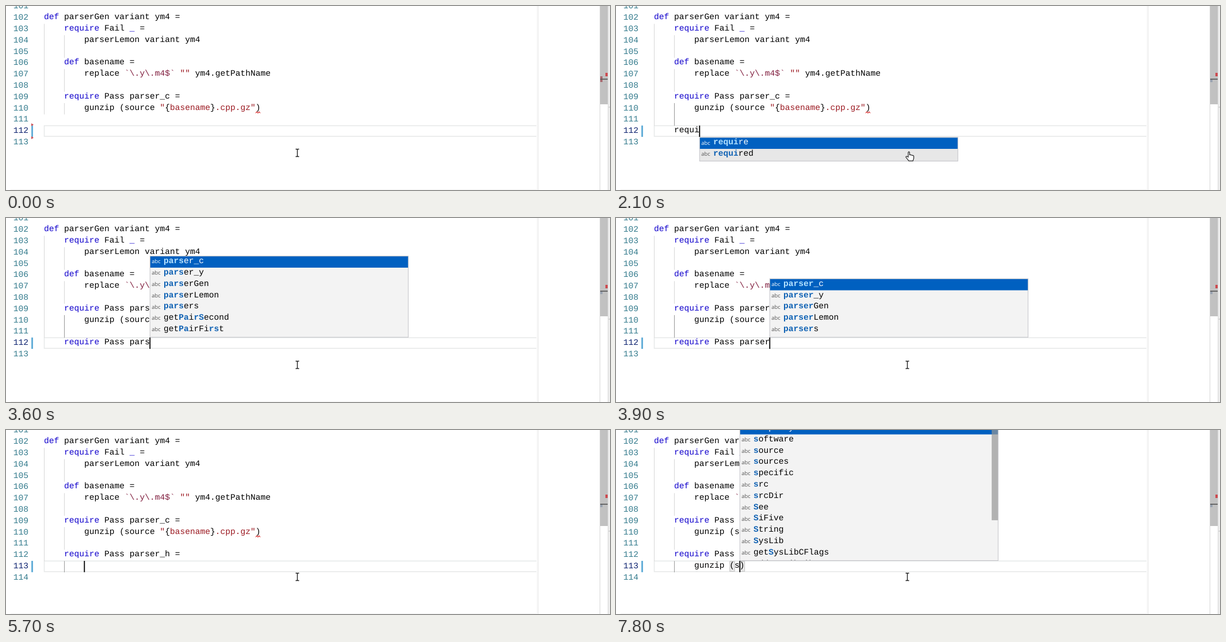
An HTML page that plays this animation: 1050x322 px, repeating every 8 s.

```html
<!DOCTYPE html>
<html lang="en">
<head>
<meta charset="utf-8">
<title>Code completion</title>
<style>
  html, body { margin: 0; width: 100%; height: 100%; overflow: hidden; background: #fff; }
  svg { display: block; width: 1050px; height: 322px; }
  text { font: 14.6px "Liberation Mono", monospace; fill: #000; white-space: pre; text-rendering: geometricPrecision; }
  .k { fill: #1000cc; }
  .s { fill: #9c1a22; }
  .r { fill: #811f3f; }
  .n { fill: #327a8c; }
  .on { fill: #0b216f; }
  .m { fill: #0f62b4; font-weight: bold; }
  .w { fill: #fff; }
  .wm { fill: #b5e2ff; font-weight: bold; }
  .abc { font: 9.4px "Open Sans", sans-serif; fill: #555; }
  .abc.w { fill: #fff; }
</style>
</head>
<body>
<svg id="stage" viewBox="0 0 1050 322"></svg>
<script>
const LOOP = 8000, STEP = 300;
const CW = 8.757, LH = 19.8, LEFT = 66;
const stage = document.getElementById('stage');

const lines = [
  '<k>def</> parserGen variant ym4 =',
  '    <k>require</> Fail <k>_</> =',
  '        parserLemon variant ym4',
  '',
  '    <k>def</> basename =',
  '        replace <r>`\\.y\\.m4$`</> <s>""</> ym4.getPathName',
  '',
  '    <k>require</> Pass parser_c =',
  '        gunzip (source <s>"</>{<s>basename</>}<s>.cpp.gz"</>)',
  ''
];

const words = list => list.split(' ');
const rWords = words('require required replace result return rules run runtime read resources');
const pWords = words('Pass Path Pair Package parser_c parser_y parserGen parserLemon parsers path prefix publish');
const parsWords = words('parser_c parser_y parserGen parserLemon parsers getPairSecond get*Pa*irFi*rs*t');
const gWords = words('getPathName gunzip getPairFirst getPairSecond getPathParent getSysLibCFlags global glob generated group grep');
const sWords = words('simplify software source sources specific src srcDir See SiFive String SysLib getSysLibCFlags addSysLibLibs');
const reqWords = rWords.slice(0, 2);

const PASS = '    require Pass ', GUN = '        gunzip';
// row, text before the caret, caret shown, completion list, pointer, text after the caret
const steps = [
  [112, '', 0],
  [112, '', 1],
  [112, '    ', 1],
  [112, '    ', 0],
  [112, '    r', 1, rWords],
  [112, '    re', 1, rWords.slice(0, 5)],
  [112, '    req', 1, reqWords, 'arrow'],
  [112, '    requi', 1, reqWords, 'hand'],
  [112, '    require', 1, reqWords, 'hand'],
  [112, '    require P', 1, pWords],
  [112, '    require Pass', 1, ['Pass', 'parsers'], 'arrow'],
  [112, PASS + 'p', 1, pWords],
  [112, PASS + 'pars', 1, parsWords],
  [112, PASS + 'parser', 1, parsWords.slice(0, 5)],
  [112, PASS + 'parser_', 1, parsWords.slice(0, 2), 'arrow'],
  [112, PASS + 'parser_h', 1],
  [112, PASS + 'parser_h', 0],
  [112, PASS + 'parser_h =', 1],
  [112, PASS + 'parser_h =', 0],
  [113, '        ', 1],
  [113, '        ', 0],
  [113, '        g', 1, gWords],
  [113, '        gun', 1, ['gunzip'], 'arrow'],
  [113, GUN, 0, ['gunzip'], 'arrow'],
  [113, GUN + ' ', 1],
  [113, GUN + ' (', 1, null, '', ')'],
  [113, GUN + ' (s', 1, sWords, '', ')']
];

const lineTop = n => 209.2 + LH * (n - 112);
const baseline = n => 23.2 + LH * (n - 102);
const rect = (x, y, w, h, fill, more = '') =>
  `<rect x="${x}" y="${y}" width="${w}" height="${h}" fill="${fill}" ${more}/>`;
const text = (x, y, str, cls = '') => `<text x="${x}" y="${y}" class="${cls}">${str}</text>`;

// Places coloured runs on the character grid.
function runs(x, y, parts) {
  let col = 0, out = '';
  for (const [str, cls] of parts) {
    if (str.trim()) {
      const lead = str.length - str.trimStart().length;
      out += text(x + (col + lead) * CW, y, str.trim(), cls);
    }
    col += str.length;
  }
  return out;
}

function code(n, src) {
  const parts = src.split(/(<\w>.*?<\/>)/).map(p =>
    /^<\w>/.test(p) ? [p.slice(3, -3), p[1]] : [p, '']);
  return runs(LEFT, baseline(n), parts);
}

const keywords = str => str.replace(/\brequire\b/, '<k>require</>');

// Splits a suggestion into matched and plain runs.
function matchParts(word, query, plain, hit) {
  if (word.includes('*')) return word.split('*').map((p, i) => [p, i % 2 ? hit : plain]);
  let q = 0;
  return [...word].map(ch => {
    const found = q < query.length && ch.toLowerCase() === query[q].toLowerCase();
    if (found) q++;
    return [ch, found ? hit : plain];
  });
}

function popup(row, before, list, pointer) {
  const x = Math.round(LEFT + before.length * CW) + 0.3;
  const query = before.match(/\w*$/)[0];
  const shown = Math.min(list.length, 12);
  const above = shown > 4;
  const h = shown * LH + (above ? 4.5 : 3);
  const top = above ? lineTop(row) - h : lineTop(row) + LH + 0.3;
  let out = `<clipPath id="box">${rect(x, top, 449, h, '#000')}</clipPath><g clip-path="url(#box)">`;
  out += rect(x, top, 449, h, '#f3f3f3') + rect(x, top + 1, 449, LH, '#0060c0');
  if (pointer === 'hand') out += rect(x, top + 1 + LH, 449, LH + 2, '#e7e7e7');
  list.forEach((word, i) => {
    const y = top + 13 + i * LH;
    out += text(x + 3, y + 0.3, 'abc', i ? 'abc' : 'abc w');
    out += runs(x + 23.6, y, matchParts(word, query, i ? '' : 'w', i ? 'm' : 'wm'));
  });
  if (list.length > 12) out += rect(x + 437.8, top, 11.2, 171, '#979797', 'opacity=".7"');
  return out + '</g>' + rect(x, top + 0.5, 449, h - 1, 'none', 'stroke="#c4c4c8"');
}

const pointers = {
  beam: '<path d="M503.5 250.5h2.2l.8 1 .8-1h2.2M506.5 251.5v11M503.5 263.5h2.2l.8-1 .8 1h2.2" fill="none" stroke="#222" stroke-width="1.4"/>',
  arrow: '<path d="M507 257v15l3.4-3.1 2.5 5 2.3-1.1-2.4-4.8h4.4z" fill="#222" stroke="#fff" stroke-width=".8"/>',
  hand: '<path d="M508 264.5v-8.3q1.2-2 2.4 0v4.3q1.5-.8 2.4.5 1.5-.7 2.3.6 2-.5 2.5 1v4l-1.5 4.6h-7l-5-6.4q-.4-2 1.5-1.7z" fill="#fff" stroke="#222" stroke-width="1.2"/>'
};

const guide = (x, from, to, color = '#d6d6d6') =>
  rect(x, lineTop(from) + 0.3, 1, (to - from + 1) * LH, color);

function guides(row, before) {
  const open = before.length > 0;
  let out = guide(66, 103, open ? row - 1 : 110);
  out += guide(101, 104, 105) + guide(101, 107, 108);
  if (row === 113) out += guide(101, 110, 111) + guide(101, 113, 113, '#9a9a9a');
  else out += open ? guide(101, 110, 111, '#979797') : guide(101, 110, 110);
  return out;
}

function rightSide(row, removed) {
  const late = row === 113;
  const red = late ? 113 : 117, mark = late ? 129 : 127.2;
  let out = rect(922, 0, 3, 322, '#fafafa') + rect(924.5, 0, 1, 322, '#e6e6e6');
  out += rect(1032, 0, 1, 322, '#d8d8d8') + rect(1033, 0, 13, late ? 168 : 172, '#c1c1c1');
  out += rect(1046.5, 0, 1, 322, '#bdbdbd') + rect(1047.5, 0, 2.5, 322, '#f0f0f0');
  out += rect(1047.5, 176.5, 2.5, 1, '#bbb');
  out += rect(1042, red, 4, 6, '#cc4a50');
  out += removed ? rect(1033, 123, 4, 10, '#a86a70') : rect(1033, mark + 1, 4, 5, '#98a2b0');
  return out + rect(1033, mark, 13, 1.7, '#5a5a5a');
}

function squiggle() {
  let d = 'M434 187.5';
  for (let i = 0; i < 4; i++) d += `l2 ${i % 2 ? 2.4 : -2.4}`;
  return `<path d="${d}" fill="none" stroke="#d62020" stroke-width="1.1"/>`;
}

function draw([row, before, caret, list, pointer, after = '']) {
  const top = lineTop(row), removed = !before;
  const caretX = LEFT + before.length * CW;
  let out = rect(8, 321, 917, 1, '#f3f3f3');
  out += rect(66.5, top + 0.3, 858, LH - 1.2, 'none', 'stroke="#e4e7e7" stroke-width="1.4"');
  out += guides(row, before);
  for (let n = 101; n <= row + 1; n++)
    out += text(12.8, baseline(n) + 0.9, n, n === row ? 'on' : 'n');
  lines.forEach((src, i) => { out += code(102 + i, src); });
  out += squiggle();
  out += rect(44, top, 3, LH, '#66afd8');
  if (removed) {
    for (const y of [top - 4, top + LH - 1])
      out += `<path d="M44 ${y}v5l4-2.5z" fill="#ca4b51"/>`;
  }
  if (row === 113) out += code(112, keywords(PASS + 'parser_h ='));
  if (after) {
    for (const x of [LEFT + before.indexOf('(') * CW, caretX])
      out += rect(x + 0.5, top + 1, CW - 0.5, LH - 2.5, '#ececec', 'stroke="#bdbdbd"');
  }
  out += code(row, keywords(before) + after);
  if (list) out += popup(row, before, list, pointer);
  if (caret) out += rect(Math.round(caretX) - 0.6, top, 1.8, LH, '#000');
  out += rightSide(row, removed) + pointers[pointer || 'beam'];
  stage.innerHTML = out;
}

let last = -1;
function tick() {
  const i = Math.min(steps.length - 1, Math.floor(performance.now() % LOOP / STEP));
  if (i !== last) draw(steps[last = i]);
  requestAnimationFrame(tick);
}
tick();
</script>
</body>
</html>
```
